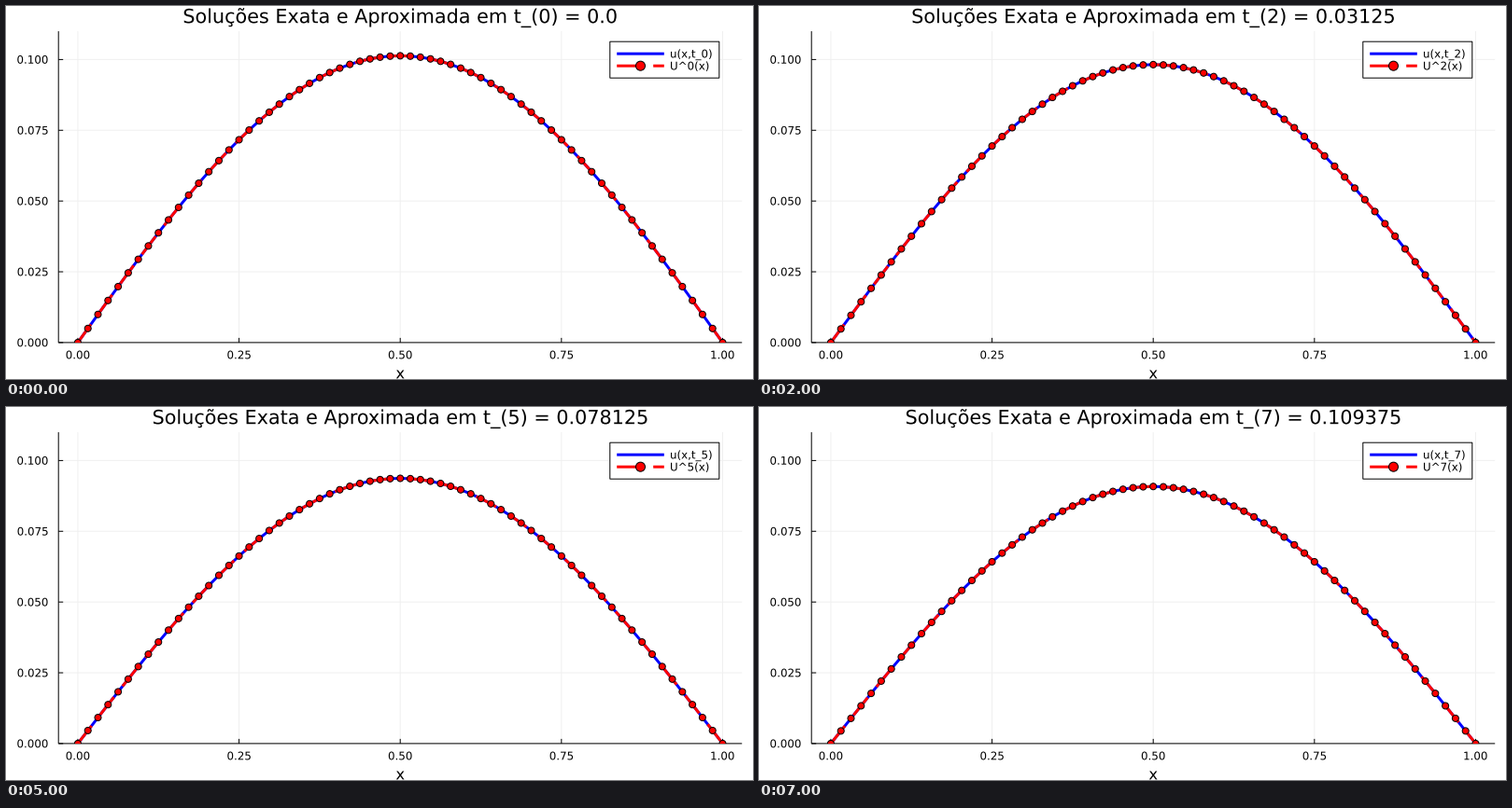
Write a matplotlib script that moves like this. It is 800 by 400 pixels and loops after 8000 ms.

```python
import numpy as np
import matplotlib
import matplotlib.pyplot as plt
from matplotlib.animation import FuncAnimation
from matplotlib.patches import Circle, PathPatch, Rectangle
from matplotlib.textpath import TextPath
from matplotlib.transforms import Affine2D

matplotlib.rcParams.update({"font.family": "DejaVu Sans", "path.snap": False})

W, H, DPI = 800, 400, 100
PT = 72 / DPI  # points per pixel
LEFT, RIGHT, TOP, BOTTOM = 56.2, 788.2, 27.05, 360.9
X_SCALE = (RIGHT - LEFT) / 1.06
X0 = LEFT + 0.03 * X_SCALE
Y_SCALE = (BOTTOM - TOP) / 0.11
CELLS, STEPS = 64, 8
SMALL, MEDIUM, LARGE = 11.85, 16.3, 20.74

fig = plt.figure(figsize=(W / DPI, H / DPI), dpi=DPI, facecolor="white")
ax = fig.add_axes([0, 0, 1, 1])
ax.set_xlim(0, W)
ax.set_ylim(H, 0)
ax.axis("off")


def px(x):
    return X0 + X_SCALE * np.asarray(x)


def py(y):
    return BOTTOM - Y_SCALE * np.asarray(y)


def line(xs, ys, color="black", width=1.0, z=2, **kw):
    kw.setdefault("solid_capstyle", "butt")
    return ax.plot(xs, ys, color=color, lw=width * PT, zorder=z, **kw)[0]


def dashed(xs, ys, z):
    return line(xs, ys, "red", 3, z, dashes=(8, 5), dash_capstyle="butt")


def dot(x, y, radius, z):
    return ax.add_patch(Circle((x, y), radius, fc="red", ec="black", lw=PT,
                               zorder=z))


def text_shape(x, y, text, size, align):
    """Text outline with its ink aligned to x (0 left, 0.5 centre, 1 right)."""
    path = TextPath((0, 0), text, size=size)
    box = path.get_extents()
    shift = x - box.x0 - align * box.width
    return Affine2D().scale(1, -1).translate(shift, y).transform_path(path)


def label(x, y, text, size, align=0.5):
    shape = text_shape(x, y, text, size, align)
    return ax.add_patch(PathPatch(shape, fc="black", lw=0, zorder=9))


def solution(x, t):
    return np.exp(-t) * np.sin(np.pi * x) / np.pi ** 2


# grid, ticks and axes
for v in np.linspace(0, 1, 5):
    x = px(v)
    line([x, x], [TOP, BOTTOM], "#f0f0f0", z=1)
    line([x, x], [BOTTOM, BOTTOM - 5])
    label(x, 378.3, f"{v:.2f}", SMALL)
for v in np.linspace(0, 0.1, 5):
    y = py(v)
    line([LEFT, RIGHT], [y, y], "#f0f0f0", z=1)
    line([LEFT, LEFT + 5], [y, y])
    label(44.6, y + 4.3, f"{v:.3f}", SMALL, 1)
line([LEFT, LEFT], [TOP, BOTTOM])
line([LEFT, RIGHT], [BOTTOM, BOTTOM])
label(422.2, 399.4, "x", MEDIUM)

# curves
nodes = np.linspace(0, 1, CELLS + 1)
xs = px(nodes)
exact = line(xs, 0 * xs, "blue", 3, 3, solid_joinstyle="round")
approx = dashed(xs, 0 * xs, 4)
marks = [dot(x, 0, 3.5, 5) for x in xs]
plot_area = Rectangle((LEFT, TOP), RIGHT - LEFT, BOTTOM - TOP,
                      transform=ax.transData)
for part in (exact, approx, *marks):
    part.set_clip_path(plot_area)

# legend
BOX_W, ROW = 117, 13
box_x = RIGHT - (RIGHT - LEFT) / 30 - BOX_W
box_y = TOP + (BOTTOM - TOP) / 30
row1, row2 = box_y + ROW, box_y + 2 * ROW
ax.add_patch(Rectangle((box_x, box_y), BOX_W, 3 * ROW, fc="white", ec="black",
                       lw=PT, zorder=6))
line([654.2, 704.8], [row1, row1], "blue", 3, 7)
dashed([654.2, 704.8], [row2, row2], 7)
dot(679.5, row2, 5, 8)

captions = {
    (422.2, 18.2, LARGE, 0.5): "Soluções Exata e Aproximada em t_({k}) = {t}",
    (712, row1 + 4.2, SMALL, 0): "u(x,t_{k})",
    (712, row2 + 4.2, SMALL, 0): "U^{k}(x)",
}
shapes = [label(x, y, "0", size, align) for x, y, size, align in captions]


def update(k):
    t = k / CELLS
    ys = py(solution(nodes, t))
    exact.set_ydata(ys)
    approx.set_ydata(ys)
    for mark, x, y in zip(marks, xs, ys):
        mark.center = x, y
    for shape, ((x, y, size, align), text) in zip(shapes, captions.items()):
        shape.set_path(text_shape(x, y, text.format(k=k, t=t), size, align))
    return [exact, approx, *marks, *shapes]


anim = FuncAnimation(fig, update, frames=STEPS, interval=1000, repeat=True,
                     repeat_delay=0)
plt.show()
```
